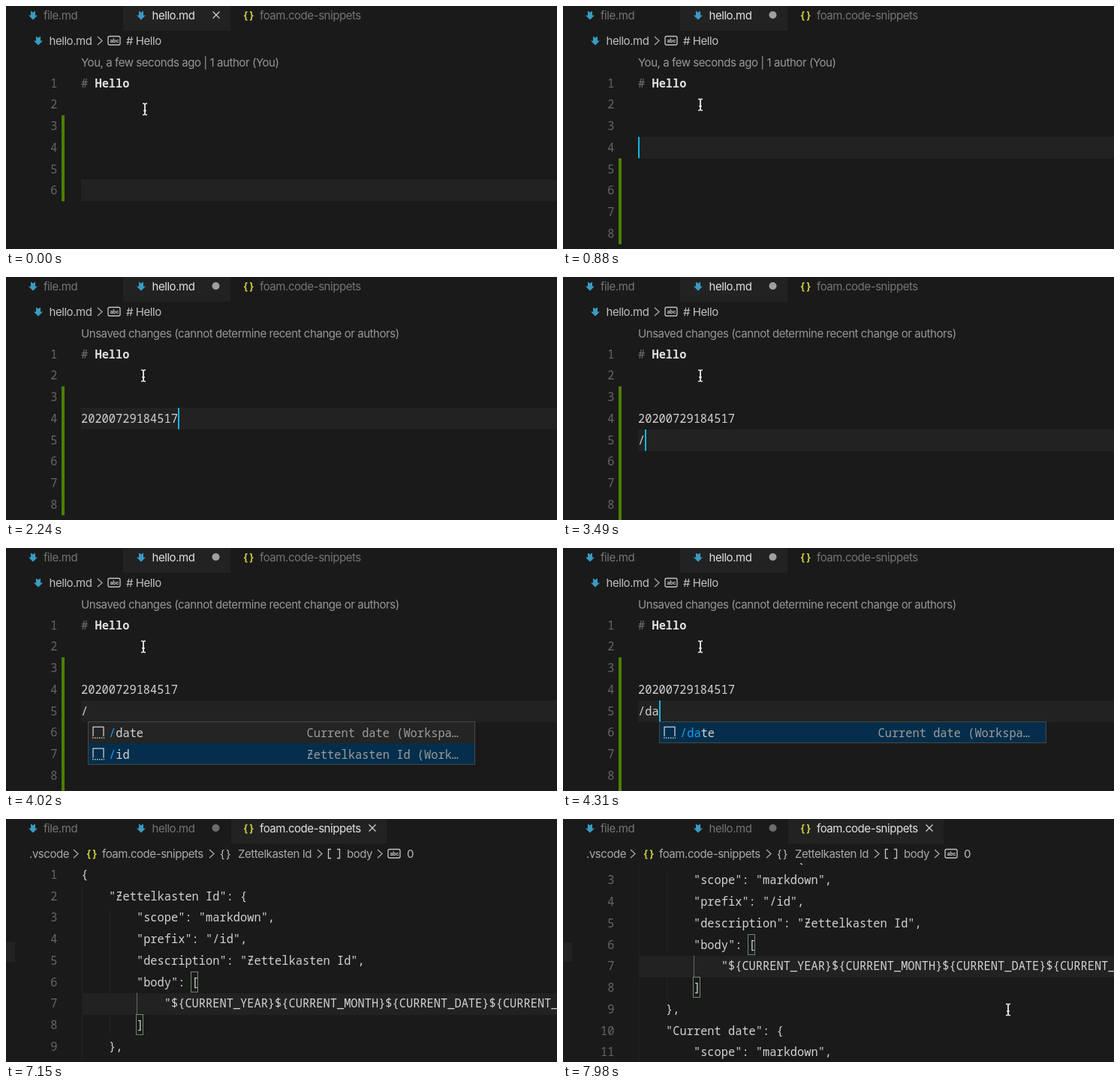
An HTML page with a canvas that plays this animation: 734x325 px, repeating every 8 s.

```html
<!DOCTYPE html>
<html lang="en">
<head>
<meta charset="utf-8">
<title>Snippet demo</title>
<style>
  html, body { margin: 0; width: 100%; height: 100%; overflow: hidden; background: #1a1a1a; }
  canvas { display: block; width: 734px; height: 325px; }
</style>
</head>
<body>
<canvas></canvas>
<script>
const W = 734, H = 325, LOOP = 8000;
const CHAR = 9.21, ROW = 28.75, LEFT = 100;
const MONO = '15.35px "Noto Sans Mono", "DejaVu Sans Mono", monospace';
const UI = '15px Inter, "Open Sans", sans-serif';
const BG = '#1a1a1a', LIT = '#222222', TEXT = '#d2d2d2', DIM = '#757575', SOFT = '#a9a9a9', YELLOW = '#cbcb41';

const OPEN_SNIPPETS = 6620, LENS_UPDATE = 1530, DIFF_UPDATE = 1290;
const STAMP_ID = '20200729184517', STAMP_DATE = '2020-07-29 18:45:19';

// Each keypress: time, cursor row, number of rows, text of rows 4 and 5.
// The first time only sets the phase of the caret blink.
const KEYS = [
  [-920, 6, 6], [410, 2, 6], [700, 3, 7], [880, 4, 8],
  [1060, 4, 8, '/'], [1710, 4, 8, '/i'], [1830, 4, 8, '/id'], [2240, 4, 8, STAMP_ID],
  [3020, 5, 9, STAMP_ID], [3490, 5, 9, STAMP_ID, '/'],
  [4200, 5, 9, STAMP_ID, '/d'], [4310, 5, 9, STAMP_ID, '/da'],
  [4730, 5, 9, STAMP_ID, STAMP_DATE], [5700, 6, 10, STAMP_ID, STAMP_DATE]
];

// Pointer positions; entries without x hide it.
const POINTER = [
  [0, 185, 138], [60, 185, 136.5], [117, 184, 134.5], [173, 183.5, 133], [230, 183, 132],
  [5630, 195, 124], [5700, 222, 112], [5770, 247, 100], [5840, 260, 96], [5910],
  [6090, 310, 48], [6167, 345, 24], [6243, 365, 12], [6320, 369, 8],
  [7030, 440, 110], [7090, 646, 280], [7150],
  [7570, 647, 295], [7625, 615, 268], [7680, 593, 255]
];

const SCROLL = [[0, 0], [7920, 26], [7980, 50]];

const ITEMS = [['/date', 'Current date (Workspa…'], ['/id', 'Ƶettelkasten Id (Work…']];

const SNIPPETS = [
  '{',
  '    "Ƶettelkasten Id": {',
  '        "scope": "markdown",',
  '        "prefix": "/id",',
  '        "description": "Ƶettelkasten Id",',
  '        "body": [',
  '            "${CURRENT_YEAR}${CURRENT_MONTH}${CURRENT_DATE}${CURRENT_HOUR}',
  '        ]',
  '    },',
  '    "Current date": {',
  '        "scope": "markdown",',
  '        "prefix": "/date",'
];

const canvas = document.querySelector('canvas');
const scale = window.devicePixelRatio || 1;
canvas.width = W * scale;
canvas.height = H * scale;
const ctx = canvas.getContext('2d');

const latest = (steps, t) => steps.filter(step => step[0] <= t).pop();

function rect(x, y, w, h, color) {
  ctx.fillStyle = color;
  ctx.fillRect(x, y, w, h);
}

function text(str, x, y, color, font, spacing = 0) {
  ctx.font = font;
  ctx.letterSpacing = spacing + 'px';
  ctx.fillStyle = color;
  ctx.fillText(str, x, y);
}

const ui = (str, x, y, color) => text(str, x, y, color, UI, -0.44);
const mono = (str, x, y, color = TEXT, weight = '') => text(str, x, y, color, weight + ' ' + MONO);

function stroke(points, color, width = 1.3) {
  ctx.strokeStyle = color;
  ctx.lineWidth = width;
  ctx.beginPath();
  points.forEach(([x, y]) => ctx.lineTo(x, y));
  ctx.stroke();
}

function polygon(x, y, points, color) {
  ctx.fillStyle = color;
  ctx.beginPath();
  points.forEach(([dx, dy]) => ctx.lineTo(x + dx, y + dy));
  ctx.closePath();
  ctx.fill();
}

function fileIcon(x, y) {
  polygon(x, y, [[-3, -6], [0, -4], [3, -6], [3, 0], [6, 0], [0, 6], [-6, 0], [-3, 0]], '#3a9ac2');
}

function braces(x, y, color, weight = 'bold') {
  const font = weight + ' 14px "Noto Sans Mono", monospace';
  text('{', x - 1, y, color, font);
  text('}', x + 7, y, color, font);
}

function cross(x, y) {
  stroke([[x - 4.5, y - 4.5], [x + 4.5, y + 4.5]], '#cfcfcf');
  stroke([[x - 4.5, y + 4.5], [x + 4.5, y - 4.5]], '#cfcfcf');
}

function dot(x, y, color) {
  ctx.fillStyle = color;
  ctx.beginPath();
  ctx.arc(x, y, 5, 0, Math.PI * 2);
  ctx.fill();
}

const chevron = x => stroke([[x, 41], [x + 6, 46.5], [x, 52]], SOFT);

function stringIcon(x) {
  ctx.strokeStyle = '#c4c4c4';
  ctx.lineWidth = 1.3;
  ctx.beginPath();
  ctx.roundRect(x, 40.5, 16, 11.5, 2);
  ctx.stroke();
  text('abc', x + 2.5, 48.8, '#c4c4c4', 'bold 7px Inter, sans-serif', -0.3);
}

function tabs(t) {
  const snippets = t >= OPEN_SNIPPETS;
  const hover = t >= 6243;
  if (snippets) rect(300, 0, 207, 33, LIT);
  else rect(156, 0, 143, 33, LIT);
  fileIcon(36, 12.5);
  ui('file.md', 50, 18, DIM);
  fileIcon(180, 12.5);
  ui('hello.md', 194.5, 18, snippets ? DIM : '#e2e2e2');
  if (t < 700) cross(280, 12);
  else dot(279.5, 12, snippets ? '#6c6c6c' : '#a0a0a0');
  braces(316, 17, YELLOW);
  ui('foam.code-snippets', 338, 18, snippets ? '#e2e2e2' : DIM);
  if (hover) cross(488, 12);
}

function noteCrumbs() {
  fileIcon(43, 46.5);
  ui('hello.md', 57.5, 52, '#c0c0c0');
  chevron(122);
  stringIcon(136);
  ui('# Hello', 160, 52, '#c0c0c0');
}

function snippetCrumbs() {
  ui('.vscode', 31, 52, SOFT);
  chevron(90);
  braces(107, 51, YELLOW);
  ui('foam.code-snippets', 128, 52, SOFT);
  chevron(271);
  braces(285, 51, '#c4c4c4', 'normal');
  ui('Zettelkasten Id', 309, 52, SOFT);
  chevron(415);
  stroke([[433, 40.5], [429.5, 40.5], [429.5, 52.5], [433, 52.5]], '#c4c4c4');
  stroke([[441, 40.5], [444.5, 40.5], [444.5, 52.5], [441, 52.5]], '#c4c4c4');
  ui('body', 454, 52, SOFT);
  chevron(495);
  stringIcon(509);
  ui('0', 534, 52, '#c0c0c0');
}

function lineNumber(n, baseline) {
  const label = String(n);
  mono(label, 68.4 - label.length * CHAR, baseline, '#666666');
}

function isSubsequence(typed, label) {
  let i = 0;
  for (const c of label) if (c === typed[i]) i++;
  return i === typed.length;
}

function suggestions(typed, x, top) {
  const items = ITEMS.filter(([label]) => isSubsequence(typed, label));
  const selected = typed === '/' ? 1 : 0;
  const height = items.length * ROW;
  rect(x, top, 516, height, '#242424');
  items.forEach(([label, detail], i) => {
    const y = top + i * ROW;
    if (i === selected) rect(x, y, 516, ROW, '#042e4b');
    const [l, r, bottom] = [x + 7, x + 21, y + 21.5];
    stroke([[l, bottom - 2], [l, y + 7], [r, y + 7], [r, bottom - 2]], '#cccccc');
    ctx.setLineDash([1.5, 1.5]);
    stroke([[l - 1, bottom], [r + 1, bottom]], '#cccccc', 1.6);
    ctx.setLineDash([]);
    let matched = 0;
    [...label].forEach((c, k) => {
      const hit = c === typed[matched];
      if (hit) matched++;
      mono(c, x + 28 + k * CHAR, y + 20.8, hit ? '#1a9bf5' : TEXT);
    });
    mono(detail, x + 291.5, y + 20.8, '#9c9c9c');
  });
  ctx.strokeStyle = '#484848';
  ctx.lineWidth = 1;
  ctx.strokeRect(x + 0.5, Math.round(top) + 0.5, 515, Math.round(height) - 1);
}

function note(t) {
  const [pressed, row, rows, fourth = '', fifth = ''] = latest(KEYS, t);
  const top = n => 88.7 + (n - 1) * ROW;
  const lines = { 4: fourth, 5: fifth };
  const typed = lines[row] || '';
  const caretX = LEFT + typed.length * CHAR;

  rect(LEFT, Math.round(top(row)), W - LEFT, 29, LIT);
  const firstChanged = t < DIFF_UPDATE ? rows - 3 : 3;
  rect(74, top(firstChanged), 4, top(rows + 1) - top(firstChanged), '#4c7f05');

  const lens = t < LENS_UPDATE
    ? 'You, a few seconds ago | 1 author (You)'
    : 'Unsaved changes (cannot determine recent change or authors)';
  ui(lens, LEFT, 81, '#979797');

  for (let n = 1; n <= Math.min(rows, 8); n++) {
    lineNumber(n, top(n) + 19.8);
    if (lines[n]) mono(lines[n], LEFT, top(n) + 19.8);
  }
  mono('#', LEFT, top(1) + 19.8, '#727272');
  mono('Hello', LEFT + 2 * CHAR, top(1) + 19.8, '#dedede', 'bold');

  if ((t - pressed) % 980 < 490) rect(Math.round(caretX), Math.round(top(row)), 2, 28.5, '#16b4e0');
  const menuPending = t >= 3490 && t < 3550;
  if (typed[0] === '/' && !menuPending) suggestions(typed, Math.round(caretX), top(row + 1));
}

function bracketBox(column, y) {
  ctx.strokeStyle = '#6f8a70';
  ctx.lineWidth = 1;
  ctx.strokeRect(Math.round(LEFT + column * CHAR) - 0.5, Math.round(y) + 0.5, 9, 27);
}

function snippetFile(t) {
  const offset = latest(SCROLL, t)[1];
  const top = n => 60 + (n - 1) * ROW - offset;
  rect(0, 165, 12, 26, '#232323');
  ctx.save();
  ctx.beginPath();
  ctx.rect(0, 59, W, H - 59);
  ctx.clip();
  rect(LEFT + 1, Math.round(top(7)), W - LEFT, 29, LIT);
  rect(101, top(2), 1, ROW * 10, '#202020');
  rect(138, top(3), 1, ROW * 6, '#202020');
  rect(174, top(7), 1, ROW, '#666666');
  bracketBox(16, top(6));
  bracketBox(8, top(8));
  SNIPPETS.forEach((line, i) => {
    const baseline = top(i + 1) + 19.8;
    lineNumber(i + 1, baseline);
    mono(line, LEFT + 0.3, baseline);
  });
  ctx.restore();
}

function pointer(t) {
  const [, x, y] = latest(POINTER, t);
  if (x === undefined) return;
  if (y < 59) {
    const arrow = [[0, 0], [0, 15], [3.5, 11.8], [6, 17], [8.3, 16], [6, 11], [10.5, 11]];
    polygon(x, y, arrow, '#000000');
    stroke([...arrow, arrow[0]].map(([dx, dy]) => [x + dx, y + dy]), '#ffffff', 1);
    return;
  }
  stroke([[x - 3, y - 7.5], [x - 1, y - 7.5], [x, y - 6], [x, y + 6], [x - 1, y + 7.5], [x - 3, y + 7.5]], '#f2f2f2');
  stroke([[x + 3, y - 7.5], [x + 1, y - 7.5], [x, y - 6], [x, y + 6], [x + 1, y + 7.5], [x + 3, y + 7.5]], '#f2f2f2');
  stroke([[x - 2, y + 2], [x + 2, y + 2]], '#f2f2f2');
}

function draw(t) {
  ctx.setTransform(scale, 0, 0, scale, 0, 0);
  rect(0, 0, W, H, BG);
  tabs(t);
  if (t < OPEN_SNIPPETS) {
    noteCrumbs();
    note(t);
  } else {
    snippetCrumbs();
    snippetFile(t);
  }
  pointer(t);
}

const start = performance.now();
function frame() {
  draw((performance.now() - start) % LOOP);
  requestAnimationFrame(frame);
}
frame();
</script>
</body>
</html>
```
